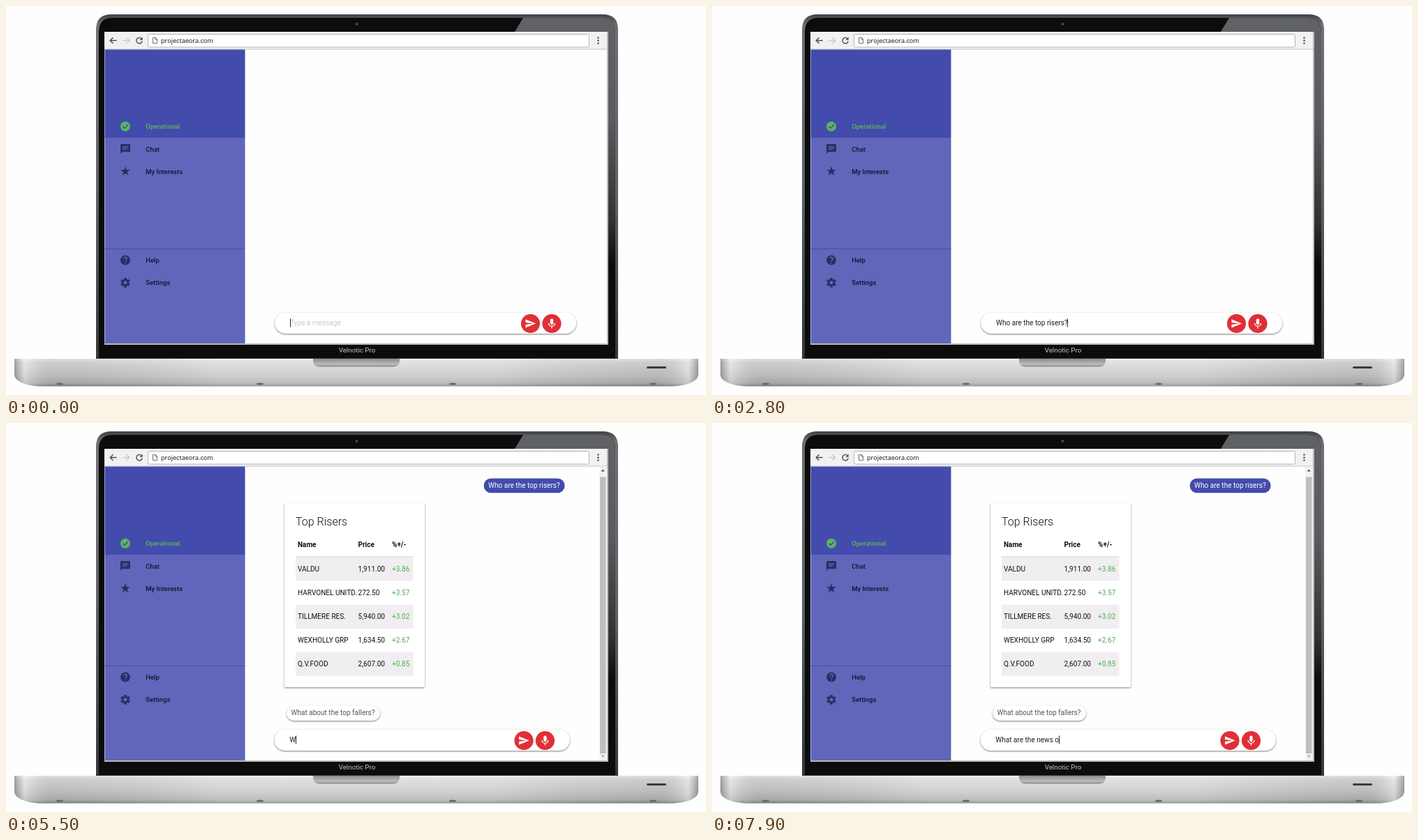
Write an HTML page that moves like this. It is 1003 px wide and 558 px high and loops after 8000 ms.

```html
<!DOCTYPE html>
<html lang="en">
<head>
<meta charset="utf-8">
<title>Chat demo</title>
<style>
  html, body { margin: 0; width: 100%; height: 100%; overflow: hidden; background: #fefefe; }
  svg { display: block; width: 1003px; height: 558px; font-family: Roboto, sans-serif; }
  .nav { font-size: 9.5px; font-weight: 500; fill: #12142e; }
  .body { font-size: 10.05px; }
  .drop { filter: drop-shadow(0 1px 1.2px rgba(0, 0, 0, .5)); }
</style>
</head>
<body>
<svg viewBox="0 0 1003 558" xmlns="http://www.w3.org/2000/svg">
  <defs>
    <linearGradient id="rim" x1="0" y1="0" x2="0" y2="1">
      <stop offset="0" stop-color="#3f4245"/><stop offset=".03" stop-color="#6d7073"/>
      <stop offset=".5" stop-color="#606366"/><stop offset="1" stop-color="#34373a"/>
    </linearGradient>
    <linearGradient id="glare" x1="0" y1="0" x2="0" y2="1">
      <stop offset="0" stop-color="#616265"/><stop offset=".3" stop-color="#5a5b5e"/>
      <stop offset=".6" stop-color="#303133"/><stop offset=".72" stop-color="#0c0c0d"/>
      <stop offset="1" stop-color="#0c0c0d"/>
    </linearGradient>
    <linearGradient id="metal" x1="0" y1="0" x2="0" y2="1">
      <stop offset="0" stop-color="#eeeef0"/><stop offset=".12" stop-color="#d9d9db"/>
      <stop offset=".6" stop-color="#c3c3c6"/><stop offset=".88" stop-color="#adadb0"/>
      <stop offset="1" stop-color="#7c7d80"/>
    </linearGradient>
    <linearGradient id="ends">
      <stop offset="0" stop-color="#555" stop-opacity=".45"/><stop offset=".015" stop-color="#fff" stop-opacity=".35"/>
      <stop offset=".06" stop-color="#777" stop-opacity=".12"/><stop offset=".3" stop-color="#fff" stop-opacity=".2"/>
      <stop offset=".7" stop-color="#fff" stop-opacity=".2"/><stop offset=".94" stop-color="#777" stop-opacity=".12"/>
      <stop offset=".985" stop-color="#fff" stop-opacity=".35"/><stop offset="1" stop-color="#555" stop-opacity=".45"/>
    </linearGradient>
    <linearGradient id="notch" x1="0" y1="0" x2="0" y2="1">
      <stop offset="0" stop-color="#8c8c90"/><stop offset=".7" stop-color="#bcbcbf"/><stop offset="1" stop-color="#858588"/>
    </linearGradient>
  </defs>

  <!-- lid -->
  <path d="M129 507V34Q129 12 151 12H855Q877 12 877 34V507Z" fill="url(#rim)"/>
  <path d="M133 505V37Q133 17 153 17H853Q873 17 873 37V505Z" fill="#0c0c0d"/>
  <path d="M741 17H853Q873 17 873 37V505H862V37H729Z" fill="url(#glare)"/>
  <circle cx="502.5" cy="26" r="2.2" fill="#2d2f33"/>
  <circle cx="502.5" cy="26" r="1" fill="#67727c"/>
  <text x="503" y="496.5" text-anchor="middle" font-size="9.8" fill="#c4c4c4">Velnotic Pro</text>

  <!-- base -->
  <g id="base">
    <path d="M12 506H992V529Q991 542 958 545.5H46Q13 542 12 529Z" fill="url(#metal)"/>
    <path d="M12 506H992V529Q991 542 958 545.5H46Q13 542 12 529Z" fill="url(#ends)"/>
    <path d="M440 506H564V510Q563 517.5 554 517.5H450Q441 517.5 440 510Z" fill="url(#notch)"/>
    <rect x="918" y="517" width="28" height="3" rx="1.5" fill="#3a3a3c"/>
  </g>

  <!-- browser -->
  <rect x="141" y="37" width="722" height="449" fill="#b9b9bb"/>
  <rect x="141" y="37" width="720" height="447" fill="#fefefe"/>
  <rect x="141" y="37" width="720" height="25" fill="#f2f1f2"/>
  <rect x="141" y="61.5" width="720" height="1" fill="#c4c4c6"/>
  <rect x="203.5" y="40.5" width="632" height="18.5" rx="2" fill="#fff" stroke="#b4b4b6"/>
  <g fill="none" stroke="#4a4a4c" stroke-width="1.4">
    <path d="M158.5 49.5H149.5M153.5 45.2L149.2 49.5L153.5 53.8"/>
    <path d="M167.5 49.5H176.5M172.5 45.2L176.8 49.5L172.5 53.8" stroke="#c9c9cb"/>
    <path d="M194.2 46.7A4.2 4.2 0 1 0 195.2 50.5"/>
    <path d="M210.5 45.3H214.2L216.5 47.6V53.6H210.5ZM214 45.3V48H216.5" stroke="#6c6c6e" stroke-width="1"/>
  </g>
  <path d="M195.6 44.6V48.8H191.4Z" fill="#4a4a4c"/>
  <g fill="#4a4a4c"><circle cx="848.5" cy="45.5" r="1.2"/><circle cx="848.5" cy="49.5" r="1.2"/><circle cx="848.5" cy="53.5" r="1.2"/></g>
  <text x="222" y="52.8" font-family="'Open Sans', sans-serif" font-size="9.15" fill="#111">projectaeora.com</text>

  <!-- side menu -->
  <rect x="141.5" y="62.5" width="201" height="127" fill="#434bad"/>
  <rect x="141.5" y="189" width="201" height="295" fill="#6166bb"/>
  <rect x="141.5" y="347.8" width="201" height="1" fill="#474d9d"/>
  <g id="menu"></g>

  <!-- chat -->
  <g id="bubble">
    <rect x="694" y="85.5" width="116" height="20.7" rx="10.3" fill="#434bad"/>
    <text class="body" x="700.5" y="99.3" fill="#fff">Who are the top risers?</text>
  </g>
  <path id="spinner" fill="none" stroke="#5a84cf" stroke-width="2.2"/>
  <g id="answer"></g>
  <g class="drop"><rect id="bar" y="439.5" height="30.5" rx="15.2" fill="#fff"/></g>
  <text id="hint" class="body" y="458" fill="#c8c8c8">Type a message</text>
  <text id="typed" class="body" y="458" fill="#1c1c1c"></text>
  <rect id="caret" y="448.5" width="1" height="12" fill="#222"/>
  <g id="buttons">
    <circle cx="751.5" cy="455.5" r="13.6" fill="#e12f37"/>
    <path d="M744.5 461.6L759.2 455.5L744.5 449.4V454.1L755 455.5L744.5 456.9Z" fill="#fff"/>
    <circle cx="782" cy="455.5" r="13.6" fill="#e12f37"/>
    <rect x="779.8" y="448.5" width="4.4" height="8.6" rx="2.2" fill="#fff"/>
    <path d="M777.6 455A4.4 4.4 0 0 0 786.4 455M782 459.4V462.4" fill="none" stroke="#fff" stroke-width="1.4"/>
  </g>
</svg>

<script>
const LOOP = 8000, STEP = 100;
const SENT = 3100, ANSWERED = 4600;
const $ = id => document.getElementById(id);
const label = (x, y, s, attrs = 'class="body"') => `<text x="${x}" y="${y}" ${attrs}>${s}</text>`;
const box = (x, y, w, h, attrs) => `<rect x="${x}" y="${y}" width="${w}" height="${h}" ${attrs}/>`;

// Icons are drawn around 0,0
const DARK = '#2a2e66', GREEN = '#5ab65d';
const disc = c => `<circle r="7" fill="${c}"/>`;
const starPath = 'M' + Array.from({ length: 10 }, (_, i) => {
  const r = i % 2 ? 2.9 : 7.2, a = (i * 36 - 90) * Math.PI / 180;
  return (r * Math.cos(a)).toFixed(2) + ' ' + (r * Math.sin(a)).toFixed(2);
}).join('L') + 'Z';
const teeth = Array.from({ length: 6 }, (_, i) =>
  box(-1.9, -6.9, 3.8, 4, `rx=".6" transform="rotate(${i * 60})"`)).join('');
const icons = {
  check: disc(GREEN) + '<path d="M-3.6 .2L-1.2 2.6L3.9 -2.6" fill="none" stroke="#434bad" stroke-width="1.5"/>',
  chat: `<path d="M-5.6 -7H5.6Q7 -7 7 -5.6V2.8Q7 4.2 5.6 4.2H-4.2L-7 7V-5.6Q-7 -7 -5.6 -7Z" fill="${DARK}"/>
    <path d="M-4.2 -3.5H4.2M-4.2 -1.4H4.2M-4.2 .8H1.4" stroke="#6166bb" stroke-width="1.1"/>`,
  star: `<path d="${starPath}" fill="${DARK}"/>`,
  help: disc(DARK) + `<path d="M-2.1 -2A2.1 2.1 0 1 1 1.4 -.6Q0 .5 0 2M0 3.4V4.9" fill="none" stroke="#6166bb" stroke-width="1.4"/>`,
  gear: `<g fill="${DARK}">${teeth}</g><circle r="3.8" fill="none" stroke="${DARK}" stroke-width="2.6"/>`
};
const menu = [
  ['check', 'Operational', 172.7], ['chat', 'Chat', 205], ['star', 'My Interests', 237.3],
  ['help', 'Help', 364.6], ['gear', 'Settings', 396.8]
];
$('menu').innerHTML = menu.map(([icon, name, y]) =>
  `<g transform="translate(171 ${y})">${icons[icon]}</g>` +
  label(200.2, y + 3.5, name, `class="nav"${icon === 'check' ? ` style="fill:${GREEN}"` : ''}`)).join('');

$('base').innerHTML += [77, 364, 640, 927].map(x =>
  `<ellipse cx="${x}" cy="542" rx="5" ry="1.5" fill="#68686b"/>`).join('');

// Answer card, suggestion and scrollbar
const rows = [
  ['VALDU', '1,911.00', '+3.86'], ['HARVONEL UNITD.', '272.50', '+3.57'],
  ['TILLMERE RES.', '5,940.00', '+3.02'], ['WEXHOLLY GRP', '1,634.50', '+2.67'],
  ['Q.V.FOOD', '2,607.00', '+0.85']
];
const cols = [418, 504.5, 553];
const bold = 'font-size="10" font-weight="700" fill="#111"';
$('answer').innerHTML =
  box(399, 115, 201, 264, 'rx="1" fill="#fff" class="drop"') +
  label(415, 147, 'Top Risers', 'font-size="16" font-weight="300" fill="#111"') +
  ['Name', 'Price', '%+/-'].map((s, i) => label(cols[i], 178, s, bold)).join('') +
  rows.map((row, r) => {
    const y = 192.3 + r * 34.15;
    return (r % 2 ? '' : box(415, y, 168.5, 34.15, 'fill="#f0eef0"')) +
      row.map((s, i) => label(cols[i], y + 20.5, s, `class="body" fill="${i === 2 ? '#4caf50' : '#111'}"`)).join('');
  }).join('') +
  box(415, 191.3, 168.5, 1, 'fill="#d3d2d4"') +
  box(402, 405.3, 134, 21.7, 'rx="10.8" fill="#fff" class="drop"') +
  label(408.5, 419.4, 'What about the top fallers?', 'class="body" fill="#555"') +
  box(850.5, 62.5, 9.5, 421.5, 'fill="#f1f1f2"') +
  box(851, 77.5, 8.5, 396.5, 'fill="#bfbfc1"') +
  '<path d="M852.6 69.5L855.2 66.5L857.8 69.5Z" fill="#505052"/>' +
  '<path d="M852.6 476.8L855.2 479.8L857.8 476.8Z" fill="#a3a3a5"/>';

// Moments at which each character arrives
const entries = [
  { from: -400, text: 'Who are the top risers?',
    keys: [500, 600, 700, 900, 1000, 1100, 1200, 1300, 1400, 1500, 1600, 1800, 1800,
           1900, 2000, 2100, 2300, 2300, 2400, 2500, 2600, 2800, 2800] },
  { from: SENT, text: 'What are the news o',
    keys: [5400, 5600, 5700, 5800, 5900, 6100, 6200, 6400, 6500, 6600, 6700,
           6900, 7000, 7100, 7200, 7500, 7600, 7700, 7900] }
];

const show = (id, on) => $(id).setAttribute('visibility', on ? 'visible' : 'hidden');

function arc(ms) {
  const sweep = 20 + 250 * Math.sin(Math.PI * ms / 1333) ** 2;
  const start = -32 + 360 * ms / 1568;
  const at = deg => {
    const a = deg * Math.PI / 180;
    return (411.5 + 11.2 * Math.cos(a)).toFixed(2) + ' ' + (128.3 + 11.2 * Math.sin(a)).toFixed(2);
  };
  return `M${at(start)}A11.2 11.2 0 ${sweep > 180 ? 1 : 0} 1 ${at(start + sweep)}`;
}

function draw(t) {
  const sent = t >= SENT, answered = t >= ANSWERED;
  const { from, text, keys } = entries[sent ? 1 : 0];
  const count = keys.filter(k => k <= t).length;
  const lastKey = count ? keys[count - 1] : from;
  const left = answered ? 406.3 : 407;

  show('bubble', sent);
  $('bubble').setAttribute('transform', answered ? 'translate(-9.4 -6)' : '');
  show('spinner', sent && !answered);
  $('spinner').setAttribute('d', arc(t - SENT));
  show('answer', answered);

  $('bar').setAttribute('x', answered ? 384.5 : 385.2);
  $('bar').setAttribute('width', answered ? 423.5 : 432);
  $('buttons').setAttribute('transform', answered ? 'translate(-9.5 0)' : '');

  show('hint', !count);
  $('hint').setAttribute('x', left);
  $('typed').setAttribute('x', left);
  $('typed').textContent = text.slice(0, count).replace(/ /g, '\u00a0');
  const width = count ? $('typed').getComputedTextLength() : 0;
  $('caret').setAttribute('x', Math.round(left + width - .2));
  show('caret', Math.floor((t - lastKey) / 500) % 2 === 0);
}

const begin = performance.now();
let shown = -1;
function tick(now) {
  const t = Math.floor(Math.max(0, now - begin) % LOOP / STEP) * STEP;
  if (t !== shown) draw(shown = t);
  requestAnimationFrame(tick);
}
draw(0);
requestAnimationFrame(tick);
</script>
</body>
</html>
```
